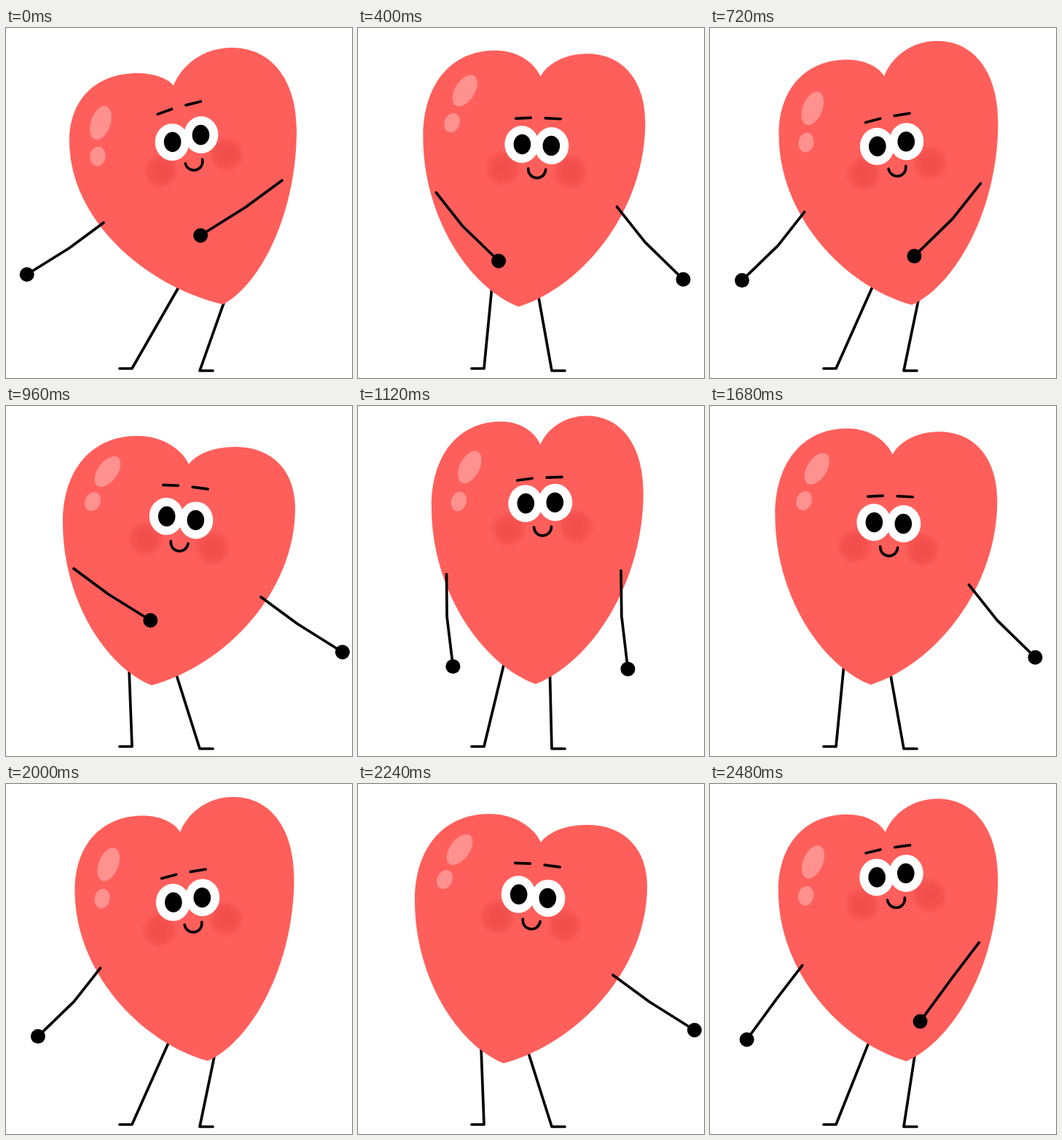
These frames come from a looping animation (475 px wide and 480 px high, 2.56 s). An HTML page with a canvas:

```html
<!DOCTYPE html>
<html lang="en">
<head>
<meta charset="utf-8">
<title>Dancing heart</title>
<style>
  html, body { margin: 0; width: 100%; height: 100%; overflow: hidden; background: #fff; }
  canvas { display: block; }
</style>
</head>
<body>
<canvas id="stage" width="475" height="480"></canvas>
<script>
const ctx = document.getElementById('stage').getContext('2d');
const RED = '#ff5f5b', SHINE = '#ff918e', INK = '#000';
const STEP = 80, STEPS = 32, SWAY = 8;
const FLOOR = 380; // height of the tip, where the body does not stretch

const rad = deg => deg * Math.PI / 180;
const mix = (a, b, k) => a + (b - a) * k;

// One sway: tip to the right at phase 0, to the left at phase 4, tall in between.
function swayAt(phase) {
  const turn = phase / SWAY * 2 * Math.PI;
  const sin = Math.sin(turn), cos = Math.cos(turn);
  const lean = 1 - Math.abs(1 - phase / 4) - 0.055 * sin;
  const stretch = sin * sin;

  // A point of the body, given at both ends of the sway.
  function at(x0, y0, x1, y1) {
    const x = mix(x0, x1, lean), y = mix(y0, y1, lean);
    const up = (FLOOR - y) * stretch;
    return [x + (325 - x) * up * 0.00035, y - up * 0.088];
  }
  return { sin, cos, lean, at };
}

function ellipse([x, y], rx, ry, color, tilt = 0) {
  ctx.fillStyle = color;
  ctx.beginPath();
  ctx.ellipse(x, y, rx, ry, rad(tilt), 0, 2 * Math.PI);
  ctx.fill();
}

function line(...points) {
  ctx.beginPath();
  for (const [x, y] of points) ctx.lineTo(x, y);
  ctx.stroke();
}

function drawLeg([x, y], toe, heel, ground) {
  const k = 1.06; // tuck the hip under the body
  line([toe, ground], [heel, ground], [mix(heel, x, k), mix(ground, y, k)]);
}

// The arm swings like a pendulum, its hand lagging a little behind.
function drawArm([x, y], length, { sin, cos }) {
  const angle = rad(-56 * cos - 4 * sin);
  const bend = 2.5 * cos + 3.5 * sin;
  const dx = Math.sin(angle), dy = Math.cos(angle);
  const half = length * 0.46;
  const hand = [x + dx * length, y + dy * length];
  line([x, y], [x + dx * half + dy * bend, y + dy * half - dx * bend], hand);
  ellipse(hand, 10, 10, INK);
}

// Half of the heart, from notch to tip.
function addHalf([nx, ny], [tx, ty], [sx, sy], [px, py]) {
  const round = 0.61;
  ctx.moveTo(nx, ny);
  ctx.bezierCurveTo(mix(nx, tx, 0.13), mix(ny, ty, 0.52), mix(tx, nx, 0.5), ty, tx, ty);
  ctx.bezierCurveTo(mix(tx, sx, round), ty, sx, mix(sy, ty, round), sx, sy);
  ctx.bezierCurveTo(sx, mix(sy, py, 0.47), mix(px, sx, 0.52), mix(py, sy, 0.115), px, py);
}

function drawBody({ at, lean }) {
  const notch = at(230, 79, 251, 80), tip = at(298, 379, 200, 383);
  ctx.fillStyle = RED;
  ctx.beginPath();
  addHalf(notch, at(310, 27, 315, 56), at(399, 140, 397, 140), tip);
  ctx.lineTo(...notch);
  addHalf(notch, at(180, 62, 180, 41), at(87, 155, 78, 160), tip);
  ctx.fill('nonzero');
  ellipse(at(130, 130, 139.5, 90), 13.5, 24, SHINE, mix(18, 36, lean));
  ellipse(at(126, 176, 119, 131), 10.5, 13.5, SHINE, mix(6, 25, lean));
}

function drawCheek(x, y) {
  const glow = ctx.createRadialGradient(x, y, 8, x, y, 26);
  glow.addColorStop(0, 'rgba(238, 74, 72, .8)');
  glow.addColorStop(0.5, 'rgba(238, 74, 72, .6)');
  glow.addColorStop(1, 'rgba(238, 74, 72, 0)');
  ellipse([x, y], 26, 26, glow);
}

// The face nods twice per sway.
function drawFace({ at, lean, sin, cos }) {
  const [x, y] = at(248, 151.5, 240.5, 154);
  const tilt = mix(-14, 7.5, lean);
  const brow = 10 * Math.abs(sin) - 44;
  ctx.save();
  ctx.translate(x, y + 34 * sin * cos);
  ctx.rotate(rad(tilt));
  drawCheek(-45, 34.5);
  drawCheek(48, 34.5);
  for (const eye of [-20.5, 20.5]) ellipse([eye, 0], 23.5, 25.5, '#fff', -tilt);
  for (const eye of [-20, 20]) ellipse([eye, 0], 11.8, 13.8, INK, -tilt);
  line([-30.5, brow + 2], [-10, brow]);
  line([10, brow - 0.5], [31, brow - 0.5]);
  ctx.beginPath();
  ctx.moveTo(-10, 33);
  ctx.bezierCurveTo(-9, 49, 13, 49, 14, 33);
  ctx.stroke();
  ctx.restore();
}

function draw(step) {
  const phase = step % SWAY;
  const beat = Math.round(step / 4) % 8;
  const sway = swayAt(phase);
  const { at } = sway;
  const arms = [
    () => drawArm(at(134, 267, 93, 223), 127, sway),
    () => drawArm(at(379, 209, 350, 262), 135, sway)
  ];
  // The arm that crosses the body goes behind it on the later beats.
  const crossing = arms[1 - beat % 2], outer = arms[beat % 2];
  const behind = beat > 4 && phase % 4 !== 2;

  ctx.fillStyle = '#fff';
  ctx.fillRect(0, 0, 475, 480);
  ctx.strokeStyle = INK;
  ctx.lineWidth = 3.7;
  ctx.lineCap = ctx.lineJoin = 'round';

  drawLeg(at(235, 359, 169, 361), 156, 173, 467);
  drawLeg(at(299, 377, 235, 372), 284, 266, 470);
  if (behind) crossing();
  drawBody(sway);
  drawFace(sway);
  if (!behind) crossing();
  outer();
}

const start = performance.now();
function tick() {
  draw(Math.floor((performance.now() - start) / STEP) % STEPS);
  requestAnimationFrame(tick);
}
tick();
</script>
</body>
</html>
```
